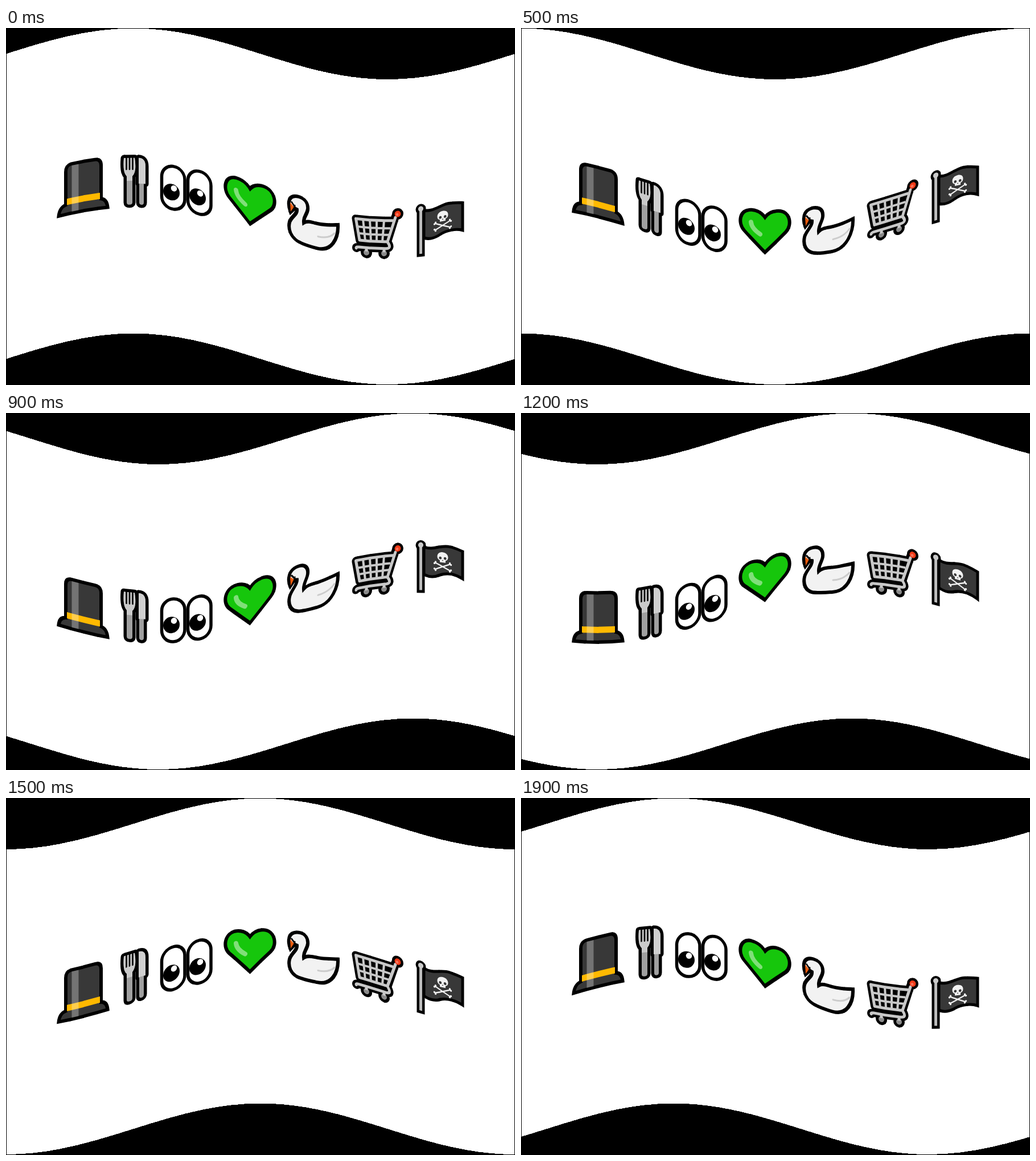
These frames come from a looping animation (894 px wide and 626 px high, 2000 ms). An HTML page without scripts:

```html
<!DOCTYPE html>
<html lang="en">
<head>
<meta charset="utf-8">
<title>Waving flag</title>
<style>
@property --a { syntax: "<angle>"; inherits: true; initial-value: 0turn; }

html, body { margin: 0; width: 100%; height: 100%; overflow: hidden; background: #000; }

#stage {
  position: relative; width: 894px; height: 626px; overflow: hidden;
  animation: phase 2s steps(20) infinite;
}
@keyframes phase { to { --a: 1turn; } }

svg { position: absolute; left: 0; top: 0; width: 894px; height: 626px; }

#cloth { animation: drift 2s steps(20) infinite; shape-rendering: crispEdges; }
@keyframes drift { to { transform: translateX(-894px); } }

/* Each slice is shifted and sheared along the same sine as the cloth. */
#row i {
  --x: calc(88 + 24 * var(--n));
  --t: calc(var(--a) + (var(--x) + 12) / 894 * 1turn);
  position: absolute; top: 0; left: calc(var(--x) * 1px);
  width: 24.5px; height: 626px; overflow: hidden;
  transform-origin: 12px 0;
  transform: matrix(1, calc(-.31416 * cos(var(--t))), 0, 1, 0, calc(.5 - 44.7 * sin(var(--t))));
}
#row svg { left: calc(var(--x) * -1px); }
</style>
</head>
<body>
<div id="stage">
<svg viewBox="0 0 894 626">
  <defs>
    <path id="wave" d="M0 44.7
      c72.9-22.9 142.6-44.7 223.5-44.7 c80.9 0 150.6 21.8 223.5 44.7
      c72.9 22.9 142.6 44.7 223.5 44.7 c80.9 0 150.6-21.8 223.5-44.7
      c72.9-22.9 142.6-44.7 223.5-44.7 c80.9 0 150.6 21.8 223.5 44.7
      c72.9 22.9 142.6 44.7 223.5 44.7 c80.9 0 150.6-21.8 223.5-44.7
      V700 H0Z"/>

    <g id="art" stroke-linejoin="round">
      <!-- top hat -->
      <path id="hat" d="M105 340V281.5Q105 270 116 270H156Q167 270 167 281.5V340
        Q177 342 178.500 356.500H92.500Q94 342 105 340Z" fill="#383838" stroke="#000" stroke-width="6" stroke-linejoin="miter"/>
      <path d="M107 329.500H165V340.500H107Z" fill="#ffb900"/>
      <path d="M115.500 273H127.500V354H115.500Z" fill="#fff" opacity=".3"/>

      <!-- fork and knife -->
      <g stroke="#000" stroke-width="11" paint-order="stroke">
        <path d="M207 272H226Q228 284 227 292Q226 300 222 304V350Q222 354 217 354Q212 354 212 350V304
          Q208 300 207 292Q206 284 207 272Z" fill="#a0a0a0"/>
        <path d="M233 272Q245 272 245 286V317H242V350Q242 354 238 354Q234 354 234 350V317H233Z" fill="#a0a0a0"/>
      </g>
      <path d="M207 272H226Q228 284 227 292Q226 300 222 304V312H212V304Q208 300 207 292Q206 284 207 272Z" fill="#cacaca"/>
      <path d="M233 272Q245 272 245 286V317H233Z" fill="#d0d0d0"/>
      <path d="M211.500 270V292M217 270V292M222.500 270V292" stroke="#000" stroke-width="2.600" stroke-linecap="round"/>

      <!-- eyes -->
      <g id="eye">
        <rect x="273.500" y="281.500" width="40.500" height="75" rx="20" fill="#fff" stroke="#000" stroke-width="5.500"/>
        <circle cx="290.500" cy="327" r="14.500"/>
        <circle cx="295" cy="320" r="5.300" fill="#fff"/>
      </g>
      <use href="#eye" x="46"/>

      <!-- heart -->
      <path d="M428.500 348.500L392 313C380 301 384 276 405 275.500C416 275.500 424 281 428.500 287
        C433 281 441 275.500 452 275.500C473 276 477 301 465 313Z" fill="#16c60c" stroke="#000" stroke-width="6" stroke-linejoin="miter"/>
      <path d="M404 297Q405 308 420 317" fill="none" stroke="#80df79" stroke-width="8" stroke-linecap="round"/>

      <!-- swan -->
      <path d="M583 308C584 332 572 357 547 357C535 357 522 356 514 354C500 350 495 337 498 324
        C501 313 512 307 511 298L507 297L499.500 306C497 300 496 296 497 289C498 279 506 275 514 275
        C526 275 531 283 530 293C529 302 522 308 523 318C530 312 540 314 549 313.500C562 313 574 310 583 308Z"
        fill="#f2f2f2" stroke="#000" stroke-width="6" stroke-linejoin="miter"/>
      <path d="M499 289L506 296L500 305Z" fill="#e8590c"/>
      <path d="M501 287L507.500 295L502 305M507 291V296" fill="none" stroke="#000" stroke-width="2.800"/>
      <path d="M548 336Q567 336 577 324" fill="none" stroke="#ccc" stroke-width="3" stroke-linecap="round"/>

      <!-- shopping cart -->
      <path d="M613.500 292H679L670 331H621Z"/>
      <g fill="none" stroke="#000" stroke-linecap="round">
        <path d="M614.500 292.500H679M614.500 292.500L621 329.500H670L684 285M670 330Q678 341 668 341.500H620Q615 341.500 615 344" stroke-width="14"/>
      </g>
      <g fill="#8a8a8a" stroke="#000" stroke-width="5">
        <circle cx="633" cy="350" r="7.500"/>
        <circle cx="664" cy="350" r="7.500"/>
        <circle cx="688" cy="281" r="7.500" fill="#f03a17"/>
      </g>
      <g fill="none" stroke="#c8c8c8" stroke-width="5">
        <path d="M614.500 292.500H679M614.500 292.500L621 329.500H670L684 287M670 330Q678 341 668 341.500H620Q615 341.500 615 344" stroke-linecap="round"/>
        <path d="M616 306H675M618 317.500H672M627 292L631 330M639 292L641 330M651 292V330M664 292L661 330" stroke-width="4"/>
        <path d="M633 342V348M664 342V348"/>
      </g>
      <circle cx="688" cy="281" r="5.500" fill="#f03a17"/>
      <circle cx="687" cy="282" r="2.500" fill="#f8735a"/>

      <!-- pirate flag -->
      <path d="M734 278.500C750 285 765 272 780 274.500C790 275.500 795 277 802 279V327C790 321 775 320 762 326
        C752 331 742 331 734 327Z" fill="#383838" stroke="#000" stroke-width="5" stroke-linejoin="miter"/>
      <path d="M728.500 274V359.500" stroke="#000" stroke-width="14"/>
      <circle cx="728.500" cy="276" r="9"/>
      <path d="M728.500 276V354.500" stroke="#bcbcbc" stroke-width="5"/>
      <circle cx="728.500" cy="275.500" r="4.600" fill="#cacaca"/>
      <g stroke="#f2f2f2" stroke-linecap="round">
        <path d="M754 305L780 316.500M780 305L754 316.500" stroke-width="2.300"/>
        <path d="M752.500 306h0M754.500 303.500h0M781.500 306h0M779.500 303.500h0M752.500 315.500h0M754.500 318h0M781.500 315.500h0M779.500 318h0" stroke-width="3.400"/>
      </g>
      <path d="M767 285.500C773.500 285.500 776.500 289.500 776.500 293.500C776.500 297 775 299 772 300V303.500H762V300C759 299 757.500 297 757.500 293.500
        C757.500 289.500 760.500 285.500 767 285.500Z" fill="#f2f2f2"/>
      <path d="M762.800 296h0M771.200 296h0" stroke="#383838" stroke-width="4.800" stroke-linecap="round"/>
      <path d="M767 298.500l-1.200 2.200h2.400Z" fill="#383838"/>
    </g>
  </defs>
  <g id="cloth">
    <use href="#wave" y=".6" fill="#fff"/>
    <use href="#wave" y="535.600"/>
  </g>
  <path d="M0 0H1V626H0ZM893 0H894V626H893ZM0 625H894V626H0Z"/>
</svg>

<div id="row">
  <i style="--n:0"><svg><use href="#art"/></svg></i>
  <i style="--n:1"><svg><use href="#art"/></svg></i>
  <i style="--n:2"><svg><use href="#art"/></svg></i>
  <i style="--n:3"><svg><use href="#art"/></svg></i>
  <i style="--n:4"><svg><use href="#art"/></svg></i>
  <i style="--n:5"><svg><use href="#art"/></svg></i>
  <i style="--n:6"><svg><use href="#art"/></svg></i>
  <i style="--n:7"><svg><use href="#art"/></svg></i>
  <i style="--n:8"><svg><use href="#art"/></svg></i>
  <i style="--n:9"><svg><use href="#art"/></svg></i>
  <i style="--n:10"><svg><use href="#art"/></svg></i>
  <i style="--n:11"><svg><use href="#art"/></svg></i>
  <i style="--n:12"><svg><use href="#art"/></svg></i>
  <i style="--n:13"><svg><use href="#art"/></svg></i>
  <i style="--n:14"><svg><use href="#art"/></svg></i>
  <i style="--n:15"><svg><use href="#art"/></svg></i>
  <i style="--n:16"><svg><use href="#art"/></svg></i>
  <i style="--n:17"><svg><use href="#art"/></svg></i>
  <i style="--n:18"><svg><use href="#art"/></svg></i>
  <i style="--n:19"><svg><use href="#art"/></svg></i>
  <i style="--n:20"><svg><use href="#art"/></svg></i>
  <i style="--n:21"><svg><use href="#art"/></svg></i>
  <i style="--n:22"><svg><use href="#art"/></svg></i>
  <i style="--n:23"><svg><use href="#art"/></svg></i>
  <i style="--n:24"><svg><use href="#art"/></svg></i>
  <i style="--n:25"><svg><use href="#art"/></svg></i>
  <i style="--n:26"><svg><use href="#art"/></svg></i>
  <i style="--n:27"><svg><use href="#art"/></svg></i>
  <i style="--n:28"><svg><use href="#art"/></svg></i>
  <i style="--n:29"><svg><use href="#art"/></svg></i>
</div>
</div>
</body>
</html>
```
